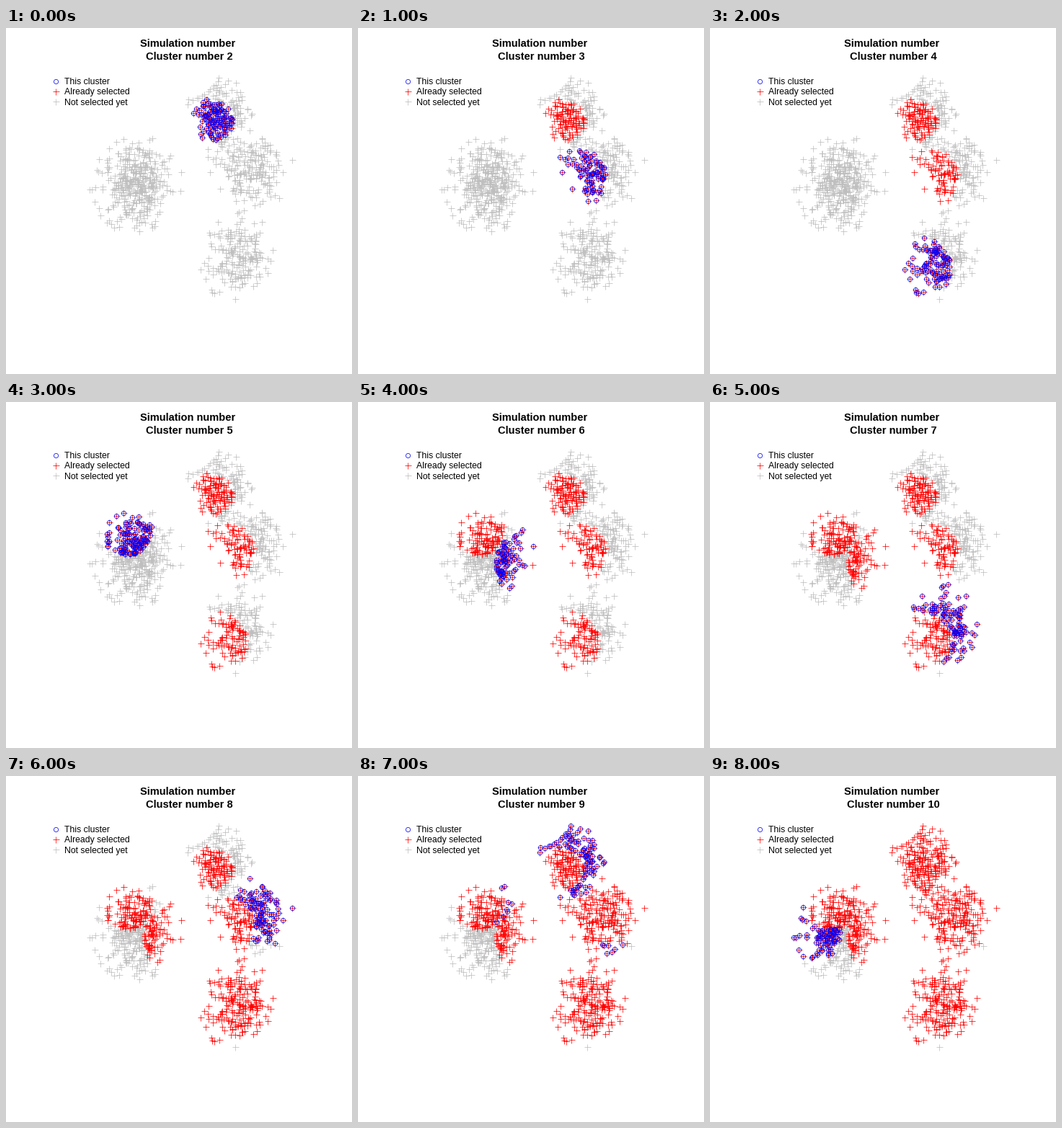
These frames come from a looping animation (480 by 480 pixels, 9 s). A matplotlib script:

```python
import numpy as np
import matplotlib.pyplot as plt
from matplotlib.animation import FuncAnimation

SIZE, DPI = 480, 72
FIRST = 2
GREY, RED, BLUE = "#bebebe", "#ff0000", "#0000ff"
LONE_SEED = (242, 226)  # starts a cluster but never gets a ring

plt.rcParams["font.family"] = "Liberation Sans"
rng = np.random.default_rng(12)


def cloud(n, center, sd):
    """Gaussian blob without points beyond 2.7 sigma."""
    z = rng.normal(size=(2 * n, 2))
    z = z[np.hypot(*z.T) < 2.7][:n]
    return z * sd + center


points = np.vstack([
    cloud(400, (180, 216), (24, 26)),
    cloud(205, (299, 119), (19, 20)),
    cloud(200, (339, 197), (23, 22)),
    cloud(205, (319, 318), (22, 24)),
    LONE_SEED,
])

# Center and radius of each cluster; it takes the points still free.
DISCS = [
    (283, 129, 31), (303, 208, 41), (292, 332, 42),
    (167, 177, 35), (*LONE_SEED, 51.5), (318, 309, 66),
    (365, 183, 50), (300, 120, 138), (140, 217, 41),
]
COUNT = len(DISCS)
group = np.full(len(points), COUNT)
for k, (cx, cy, r) in enumerate(DISCS):
    inside = np.hypot(*(points - (cx, cy)).T) < r
    group[inside & (group == COUNT)] = k
ringed = np.any(points != LONE_SEED, axis=1)

fig = plt.figure(figsize=(SIZE / DPI, SIZE / DPI), dpi=DPI, facecolor="white")
ax = fig.add_axes([0, 0, 1, 1])
ax.set(xlim=(0, SIZE), ylim=(SIZE, 0))
ax.axis("off")

PLUS = dict(ls="", marker="+", ms=9, mew=0.75)
RING = dict(ls="", marker="o", ms=6.2, mew=0.75, mfc="none")

free, = ax.plot([], [], color=GREY, **PLUS)
taken, = ax.plot([], [], color=RED, **PLUS)
current, = ax.plot([], [], color=BLUE, **RING)

legend = [("This cluster", BLUE, RING), ("Already selected", RED, PLUS),
          ("Not selected yet", GREY, PLUS)]
for i, (label, color, style) in enumerate(legend):
    y = 73.5 + 14.4 * i
    ax.plot([69.4], [y], color=color, **style)
    ax.text(81, y + 4.5, label, size=12.2, va="baseline")

TITLE = dict(size=14.6, weight="bold", ha="center", va="baseline")
ax.text(252.3, 26, "Simulation number", **TITLE)
title = ax.text(254, 44, "", **TITLE)


def show(line, mask):
    line.set_data(*points[mask].T)


def update(k):
    show(free, group > k)
    show(taken, group <= k)
    show(current, (group == k) & ringed)
    title.set_text(f"Cluster number {FIRST + k}")
    return free, taken, current, title


anim = FuncAnimation(fig, update, frames=COUNT, interval=1000, repeat=True)
plt.show()
```
